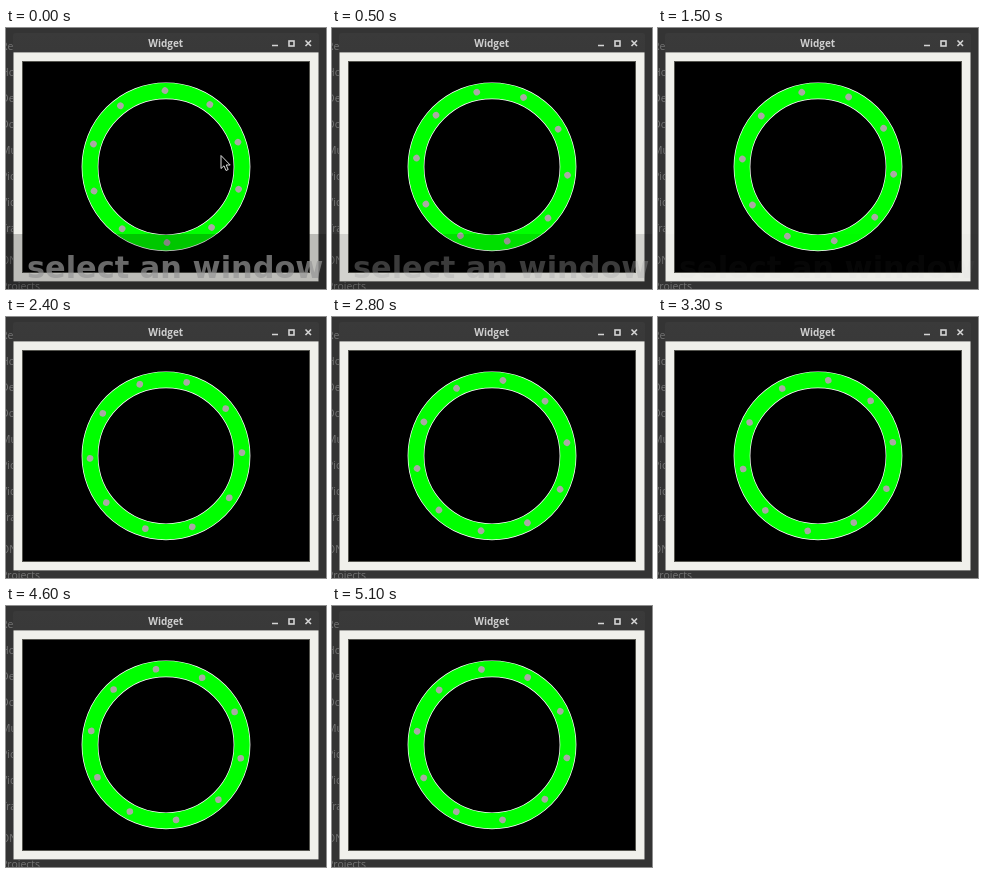
An HTML page for the animation above (5200 ms loop, 320 by 261 pixels).

```html
<!DOCTYPE html>
<html lang="en">
<head>
<meta charset="utf-8">
<title>Rotating ring</title>
<style>
  html, body { margin: 0; width: 100%; height: 100%; overflow: hidden; background: #343434; }
  svg { display: block; width: 320px; height: 261px; }
  .side { font: 10.5px "Open Sans", sans-serif; fill: #747474; }
  .title { font: bold 10px "Open Sans", sans-serif; fill: #cfcfcf; text-anchor: middle; }
  .notice { font: bold 30.4px "DejaVu Sans", sans-serif; fill: #969696; fill-opacity: .7; }
</style>
</head>
<body>
<svg viewBox="0 0 320 261">
  <defs>
    <linearGradient id="bar" x2="0" y2="1">
      <stop stop-color="#3a3a3a"/>
      <stop offset="1" stop-color="#2b2b2b"/>
    </linearGradient>
  </defs>
  <rect width="320" height="261" fill="#343434"/>
  <g id="sidebar" class="side"></g>

  <rect x="7" y="5" width="306" height="249" rx="3" fill="url(#bar)"/>
  <text class="title" x="159.7" y="18.5">Widget</text>
  <g fill="none" stroke="#d4d4d4" stroke-width="1.6">
    <path d="M266 17.5h6M299.5 12.5l5.5 5.5m0-5.5l-5.5 5.5"/>
    <rect x="283" y="13" width="5" height="5"/>
  </g>
  <rect x="7.5" y="24.4" width="305" height="229" fill="#f0f0eb"/>
  <rect x="16.5" y="33.5" width="287" height="211" stroke="#55554f"/>

  <g fill="none">
    <circle cx="160" cy="138.8" r="76" stroke="#fff" stroke-width="16.8"/>
    <circle cx="160" cy="138.8" r="76" stroke="#0f0" stroke-width="15.4"/>
  </g>
  <circle id="dots" cx="160" cy="138.6" r="76" fill="none" stroke="#a9a9a4" stroke-width="6.6"
    stroke-linecap="round" pathLength="360" stroke-dasharray="0 36"/>

  <g id="overlay">
    <rect y="206" width="320" height="55" fill-opacity=".22"/>
    <text class="notice" x="21" y="250">select an window</text>
  </g>
  <path id="cursor" d="M215 127.5v13l3-2.7 2 4.7 2.2-1-2-4.5h4z" stroke="#ddd"/>
</svg>
<script>
const STEP = 100, LOOP = 5200;
const [sidebar, dots, overlay, cursor] =
  ["sidebar", "dots", "overlay", "cursor"].map(id => document.getElementById(id));

const labels = ["Recent", "Home", "Desktop", "Documents", "Music", "Pictures", "Videos", "Trash", "ON", "Projects"];
labels.forEach((label, i) => {
  const text = document.createElementNS("http://www.w3.org/2000/svg", "text");
  text.setAttribute("x", -5);
  text.setAttribute("y", 22 + 26 * i + (i > 7 ? 6 : 0));
  text.textContent = label;
  sidebar.append(text);
});

function draw(now) {
  const step = Math.floor(now % LOOP / STEP);
  // The ring stalls briefly at the start, then turns at a steady rate.
  const angle = 6.1 + 7.12 * (Math.max(step, 1.45) - 10);
  dots.setAttribute("transform", `rotate(${angle} 160 138.6)`);
  overlay.setAttribute("opacity", Math.max(0, 1 - step / 20) ** 2);
  cursor.setAttribute("visibility", step ? "hidden" : "visible");
}

const start = performance.now();
function tick() {
  draw(performance.now() - start);
  requestAnimationFrame(tick);
}
tick();
</script>
</body>
</html>
```
